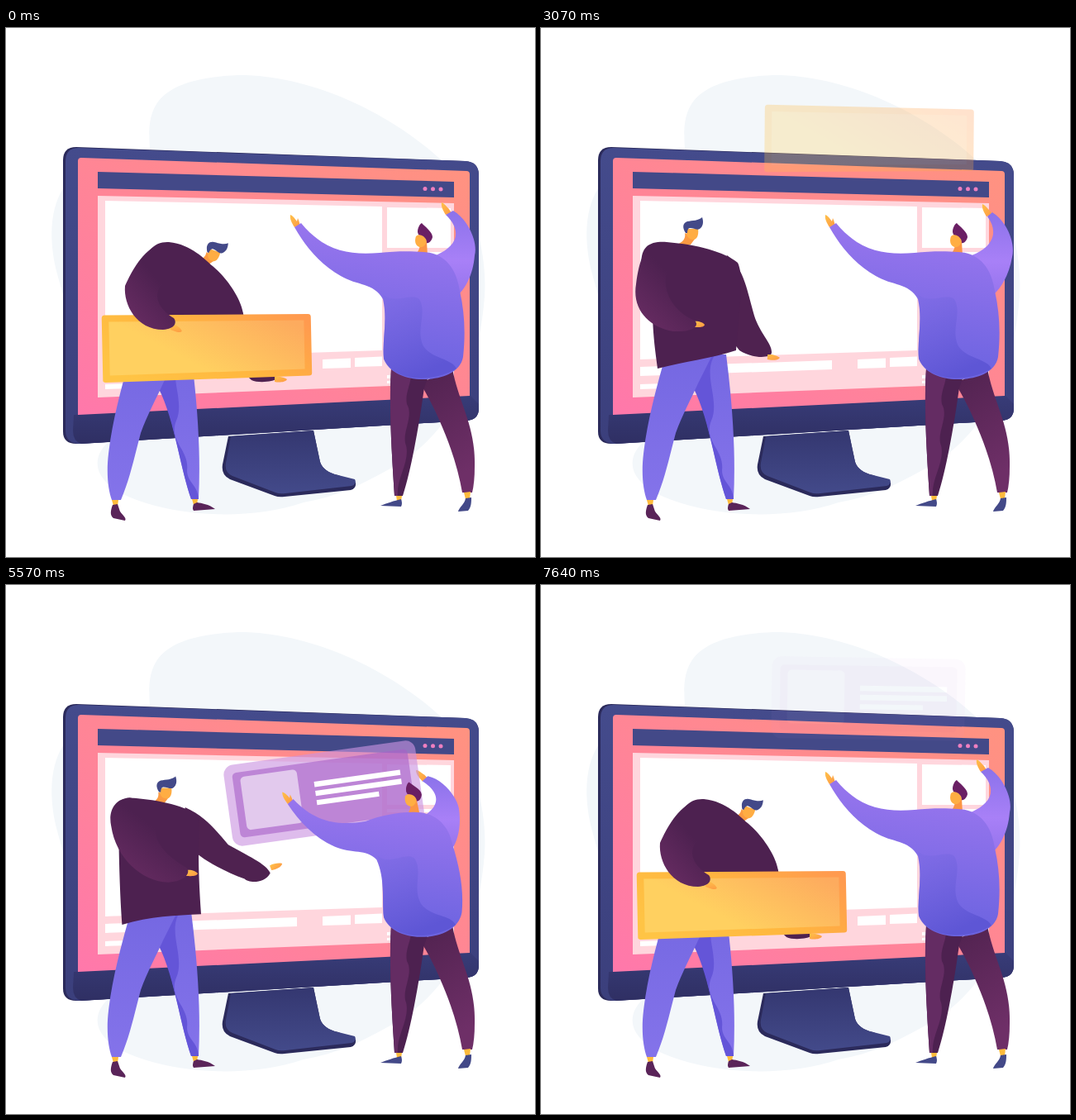
An HTML page for the animation above (7710 ms loop, 640 by 640 pixels).

```html
<!DOCTYPE html>
<html lang="en">
<head>
<meta charset="utf-8">
<title>Building a page</title>
<style>
html, body { margin: 0; width: 100%; height: 100%; overflow: hidden; background: #fff; }
svg { display: block; width: 100%; height: 100%; }
.skin { fill: url(#skin); }
.navy { fill: #434988; }
.plum { fill: #5a2459; }
.white { fill: #fff; }
.shirt { fill: url(#shirt); }
</style>
</head>
<body>
<svg viewBox="0 0 640 640">
  <defs>
    <linearGradient id="frame" x2="0" y2="1"><stop stop-color="#444b8c"/><stop offset="1" stop-color="#3b3f7c"/></linearGradient>
    <linearGradient id="chin" x2="0" y2="1"><stop stop-color="#383c78"/><stop offset="1" stop-color="#2f2f63"/></linearGradient>
    <linearGradient id="screen" y1="1" x2="1" y2="0"><stop stop-color="#ff78ab"/><stop offset="1" stop-color="#ff937f"/></linearGradient>
    <linearGradient id="stand" x2="0" y2="1"><stop stop-color="#343770"/><stop offset="1" stop-color="#434a8a"/></linearGradient>
    <linearGradient id="skin" x2="1" y2="1"><stop stop-color="#ffc14a"/><stop offset="1" stop-color="#fd9843"/></linearGradient>
    <linearGradient id="jeans" x2="0" y2="1"><stop stop-color="#7568e2"/><stop offset="1" stop-color="#8473ea"/></linearGradient>
    <linearGradient id="trousers" x2=".3" y2="1"><stop stop-color="#50224f"/><stop offset="1" stop-color="#6e2f67"/></linearGradient>
    <linearGradient id="sleeve" x1=".8" x2=".1" y2="1"><stop offset=".35" stop-color="#4d2150"/><stop offset="1" stop-color="#6a2d64"/></linearGradient>
    <linearGradient id="shirt" x1=".65" x2=".5" y2="1"><stop stop-color="#9c77ef"/><stop offset="1" stop-color="#6862df"/></linearGradient>
    <linearGradient id="shade" x2=".4" y2="1"><stop stop-color="#7d6be4" stop-opacity=".5"/><stop offset="1" stop-color="#5e56d5"/></linearGradient>
    <linearGradient id="upArm" x2="0" y2="1"><stop stop-color="#8b72ea"/><stop offset=".6" stop-color="#a880f7"/><stop offset="1" stop-color="#9674ed"/></linearGradient>
    <linearGradient id="rim" y1=".7" x2="1" y2=".2"><stop stop-color="#ffc445"/><stop offset=".5" stop-color="#ffb63f"/><stop offset="1" stop-color="#ff9a4f"/></linearGradient>
    <linearGradient id="gold" y1=".7" x2="1" y2=".2"><stop offset=".3" stop-color="#ffd060"/><stop offset="1" stop-color="#fdab5e"/></linearGradient>
  </defs>

  <path fill="#f3f7fa" d="M174 146C171 100 175 62 280 57C375 56 475 110 530 163C570 215 582 280 579 325C572 415 540 490 470 530C430 553 400 567 360 574C300 594 225 592 170 575C120 560 104 537 113 515C118 505 125 500 130 495C100 420 70 330 60 290C51 250 55 215 70 193C100 150 180 170 174 146Z"/>

  <!-- monitor -->
  <path fill="#2b2a5b" d="M269 494L262 528Q260 541 271 546L325 566Q330 568 337 567L417 559Q424 557 423 550L402 541Q384 537 380 525L372 487Z"/>
  <path fill="url(#stand)" d="M272 494L266 526Q264 538 274 542L326 562Q331 564 338 563L418 554Q425 552 422 546L402 541Q384 537 380 525L372 487Z"/>
  <path fill="#2b2a5b" d="M69 160Q69 144 85 144L555 161Q572 162 572 178L572 460Q572 474 557 475L87 503Q69 504 69 488Z"/>
  <path fill="url(#frame)" d="M72 161Q72 145 88 145L556 161Q572 162 572 178L572 460Q572 474 557 475L90 503Q72 503 72 487Z"/>
  <path fill="url(#chin)" d="M82 468L561 444L572 455V460Q572 474 557 475L91 503Q81 500 81 487Z"/>
  <path fill="url(#screen)" d="M87 161Q87 157 91 157L557 173Q561 173 561 177V445L87 468Z"/>
  <path class="navy" d="M111 174L542 186V205L111 194Z"/>
  <g fill="#ee7fc0"><circle cx="507" cy="194.5" r="2.5"/><circle cx="516.5" cy="194.8" r="2.5"/><circle cx="526" cy="195" r="2.5"/></g>
  <path fill="#ffd6dd" d="M111 203L542 212V430L111 447Z"/>
  <path class="white" d="M120 209L455 216V390L120 401ZM461 217L538 218V266H461ZM461 271H538V275H461ZM461 289H538V338H461ZM461 345H538V392H461ZM120 410L352 402V413L120 421ZM120 431L180 429V435L120 437ZM383 401L417 399.500V411L383 412ZM422 399L455 397.500V409L422 410ZM461 420L530 417V421L461 424ZM461 427L530 424V427L461 430Z"/>

  <!-- left legs -->
  <path fill="url(#jeans)" d="M180 395H224C231 450 236 510 233 570H224C210 530 203 470 186 435Z"/>
  <path fill="#6455d8" d="M210 396C195 420 217 450 206 475C196 500 222 510 219 535C219 550 232 552 233 570H224C210 530 203 470 184 435L180 400Z"/>
  <path fill="url(#jeans)" d="M149 402C138 440 128 480 124 515C121 540 124 560 128 571H139C150 545 155 520 163 490C170 470 182 448 190 430L206 398Z"/>
  <path fill="#fdbb3c" d="M128 571H136L135 578H130ZM225 570H232L231 577H227Z"/>
  <path class="plum" d="M129 577C126 585 126 590 130 593L144 596C147 592 138 588 137 582L135 576ZM227 576Q225 581 227 584L253 582C245 576 237 575 231 574Z"/>

  <path id="lFar" fill="#4f2250"/>
  <path id="lFarHand" class="skin" d="M0-3C6-4 12-2 15 0C13 4 4 4 0 3Z"/>
  <g id="lHead">
    <path fill="#fb9a42" d="M-9 0L4 6L-2 14H-18C-10 10-8 6-9 0Z"/>
    <path fill="#ffad43" d="M-7-5L7-5C8 2 6 8 1 8C-5 8-8 3-7-5Z"/>
    <path class="navy" d="M-8 0C-12-6-12-12-6-14C0-15 8-15 12-19C14-13 13-8 9-5C6-3 2-6-3-6C-5-6-6-3-6 0Z"/>
  </g>
  <path id="lTorso" fill="#4d2150"/>

  <!-- right legs -->
  <path fill="url(#trousers)" d="M500 430L540 412C548 455 568 480 567 530Q567 550 564 562H552C545 520 525 470 503 433Z"/>
  <path fill="#4d2150" d="M466 412C463 460 467 520 470 566H480C490 535 500 480 506 435L515 412Z"/>
  <path fill="#642c63" d="M466 412C463 460 467 520 470 566H474C472 545 489 525 484 505C478 490 494 470 485 455C482 440 492 430 490 412Z"/>
  <path fill="#fdbb3c" d="M472 566H479L478 572H473ZM554 562L562 561L561 570H556Z"/>
  <path class="navy" d="M478 570C470 572 460 575 453 578L478 579Q480 575 478 570ZM556 569C555 576 548 580 547 585L559 584C563 580 563 573 563 568Z"/>

  <path id="rFarHand" class="skin" d="M-3 3C-6-2-9-7-8-12C-5-11-2-7 1-4L4 1Z"/>
  <path id="rFar" fill="url(#upArm)"/>

  <g id="gold-card">
    <path fill="url(#rim)" d="M-126.500-38Q-126-41-123-41L123-37.500Q126.500-37.500 126.500-34V34Q126.500 37 123 37L-123 40.500Q-127 40.500-126.500 37Z"/>
    <path fill="url(#gold)" d="M-118-33L118-30V29L-118 32Z"/>
  </g>
  <g id="glass-card">
    <rect x="-117" y="-49" width="234" height="99" rx="12" fill="#ca93e1" fill-opacity=".62"/>
    <rect x="-107" y="-39" width="214" height="79" rx="5" fill="#a862c8" fill-opacity=".6"/>
    <rect x="-98" y="-33" width="69" height="65" rx="5" fill="#fff" fill-opacity=".56"/>
    <path class="white" d="M-10-15H95V-8.500H-10ZM-10-4H95V2.500H-10ZM-10 7.500H66V13.500H-10Z"/>
  </g>

  <path id="lHand" class="skin" d="M0-3C6-4 12-2 14 1C13 5 4 4 0 4Z"/>
  <path id="lArm" fill="url(#sleeve)"/>

  <g id="rHead">
    <path fill="#fb9545" d="M-1 5L7 0L8 18H-9C-4 14-2 10-1 5Z"/>
    <path fill="#ffae43" d="M-6-6C-2-10 5-8 7-1C6 5 2 8-2 7C-7 5-8 0-6-6Z"/>
    <path fill="#6a1f64" d="M-4-11C-4-17-1-21 1-22C4-18 14-12 14-5C13 0 9 3 7 2C7-3 4-7-3-8Z"/>
  </g>
  <path id="rHand" class="skin" d="M-3 3C-6-2-9-7-8-12C-5-11-2-7 0-4L1-8C3-4 3-1 4 1Z"/>
  <path id="rBody" class="shirt"/>
  <path id="rShade" fill="url(#shade)"/>
</svg>

<script>
const LOOP = 7710;

// Left man: hands and head are "x y angle"
const bend = {
  lTorso: 'M150 412C155 380 160 340 165 300C165 270 180 258 197 259C225 262 240 280 250 288C270 305 285 330 287 346C260 390 200 408 150 412Z',
  lFar: 'M235 280C265 300 280 325 287 346C300 380 325 410 327 424C325 428 305 430 297 426C270 400 245 370 235 340Z',
  lArm: 'M188 261C165 268 152 295 144 312C142 335 158 365 190 365C205 364 207 356 203 351C185 340 178 325 187 312C205 290 208 260 188 261Z',
  lHead: '251 274 20', lHand: '200 361 20', lFarHand: '325 425 0'
};
const lift = {
  lTorso: 'M135 402C142 380 152 350 160 322C158 280 158 258 182 257C205 258 225 275 240 288C250 310 230 350 232 414C200 402 170 402 135 402Z',
  lFar: 'M222 275C250 292 270 312 292 328C315 345 340 362 343 376C340 392 312 396 297 392C270 382 245 350 232 325Z',
  lArm: 'M180 257C160 260 156 280 160 300C165 335 185 362 215 364C238 364 246 355 239 350C220 342 207 325 206 305C210 290 205 258 180 257Z',
  lHead: '234 262 12', lHand: '240 357 0', lFarHand: '341 382 -8'
};
const give = {
  lTorso: 'M140 410C138 370 138 330 138 290C126 265 145 255 165 258C195 260 225 270 236 282C240 310 235 340 236 402C205 400 175 400 140 410Z',
  lFar: 'M215 268C240 280 250 290 270 310C300 320 328 330 333 342C325 355 305 354 298 350C270 340 240 330 215 310Z',
  lArm: 'M155 257C135 258 128 275 132 290C140 325 175 356 208 356C228 355 238 345 232 337C215 328 203 320 197 310C192 290 185 260 155 257Z',
  lHead: '198 252 0', lHand: '232 343 0', lFarHand: '334 332 -25'
};
const rest = {
  lTorso: 'M141 412C138 390 136 375 135 350C112 275 118 257 152 259C190 262 222 271 238 284C246 300 240 340 236 390C205 400 175 403 141 412Z',
  lFar: 'M225 275C245 288 250 320 258 348C265 370 280 382 279 393C278 400 255 400 240 390C220 365 215 330 215 300Z',
  lArm: 'M145 260C125 262 120 280 116 320C112 345 130 370 160 378C172 382 178 379 173 372C158 358 150 330 152 310C160 290 165 262 145 260Z',
  lHead: '186 249 0', lHand: '170 376 22', lFarHand: '274 398 3'
};
const wait = {
  ...rest,
  lArm: 'M145 260C125 262 119 280 115 310C110 340 130 362 160 367C185 368 192 360 186 354C165 345 148 325 151 300C160 285 165 262 145 260Z',
  lHead: '183 248 0', lHand: '184 358 0'
};
const ready = {
  lTorso: 'M141 412C138 395 136 380 135 340C117 280 120 256 150 258C190 262 222 270 232 280C225 310 222 330 236 392C205 400 175 403 141 412Z',
  lFar: 'M225 274C250 285 258 310 268 332C280 355 298 372 300 380C298 392 275 392 262 383C240 370 230 345 220 320Z',
  lArm: 'M145 259C125 262 120 280 123 300C126 345 150 368 178 370C196 369 202 362 196 356C175 345 160 325 160 300C165 285 165 262 145 259Z',
  lHead: '189 249 0', lHand: '195 362 5', lFarHand: '296 386 -5'
};

// Right man
const raised = {
  rBody: 'M357 236C385 270 415 275 452 272C470 270 490 270 505 271C530 272 545 290 549 318C555 345 556 370 553 398C549 420 520 426 500 425C480 424 462 415 457 400C455 375 462 355 456 328C445 308 425 312 405 300C380 286 362 264 349 241Z',
  rShade: 'M456 322C470 335 490 320 500 328C510 345 495 365 505 385C515 400 540 400 545 412C520 428 470 430 457 400C455 375 462 355 456 322Z',
  rFar: 'M541 221C560 232 571 260 567 275C565 300 555 315 548 322C530 310 520 290 515 277C548 265 552 245 532 226Z',
  rHead: '502 258 0', rHand: '352 238 0', rFarHand: '535 223 0'
};
const holding = {
  ...raised,
  rFar: 'M546 223C565 235 574 262 570 277C566 300 556 315 548 322C530 310 520 290 515 277C546 268 555 248 540 228Z',
  rFarHand: '542 225 0'
};
const reach = {
  rBody: 'M326 285C350 304 391 311 425 288C440 279 470 276 490 279C515 284 525 300 530 318C540 340 551 365 549 390C546 415 525 427 500 426C475 425 458 415 455 400C455 380 455 350 438 335C425 328 405 337 380 335C350 330 333 310 320 291Z',
  rShade: 'M440 335C460 345 480 325 490 335C500 350 488 375 500 390C512 403 540 398 546 408C525 430 470 430 455 400C455 380 455 350 440 335Z',
  rFar: 'M458 231C480 228 508 234 522 255C532 275 533 300 528 315C510 315 495 300 486 280C488 262 478 243 458 240Z',
  rHead: '471 262 -16', rHand: '322 288 -8', rFarHand: '458 235 8'
};
const grab = {
  rBody: 'M319 328C345 343 365 340 385 327C405 305 425 290 452 286C480 282 505 283 515 305C530 335 548 360 547 390C543 415 525 428 505 428C480 431 462 420 457 407C455 385 448 355 425 345C410 352 400 366 375 366C350 364 332 350 316 337Z',
  rShade: 'M430 344C450 355 460 330 476 338C490 350 478 375 495 390C510 405 535 395 541 408C520 432 470 432 457 407C455 385 448 355 430 344Z',
  rFar: 'M418 262C440 245 470 247 490 255C510 268 520 290 517 308C500 310 490 300 480 285C462 268 440 266 418 271Z',
  rHead: '453 268 -35', rHand: '318 333 -25', rFarHand: '419 267 -45'
};

const leftMan = [[0, bend], [880, lift], [1140, give], [1800, rest], [3070, wait], [3250, wait],
  [3950, bend], [4200, bend], [4930, lift], [5250, give], [6210, ready], [6950, bend], [LOOP, bend]];
const rightMan = [[0, raised], [880, reach], [1140, grab], [1600, holding], [3250, holding],
  [3950, raised], [4250, raised], [4930, reach], [5200, grab], [5750, raised], [LOOP, raised]];

const goldMove = [[0, '243 386 -1.2'], [880, '268 352 -15'], [1140, '291 314 -29'], [1350, '348 256 -22'],
  [1620, '410 205 .2'], [1860, '410 205 .2'], [2360, '406 186 .3'], [3070, '397 135 .5'], [3350, '394 122 .5'],
  [3600, '243 386 -1.2'], [LOOP, '243 386 -1.2']];
const glassMove = [[0, '396 135 .9'], [100, '396 135 .9'], [3000, '243 390 -1.2'], [4200, '243 390 -1.2'],
  [4930, '271 352 -13.5'], [5200, '295 318 -26'], [5500, '370 268 -12'], [5750, '409 212 0'],
  [6210, '411 183 .9'], [7070, '403 153 .9'], [7640, '396 137 .9'], [LOOP, '396 135 .9']];
const goldFade = [[0, '1'], [2250, '1'], [3070, '.28'], [3400, '0'], [5850, '0'], [6210, '.2'], [7150, '1'], [LOOP, '1']];
const glassFade = [[0, '0'], [3250, '0'], [3950, '1'], [6250, '1'], [7640, '.07'], [LOOP, '0']];

const numbers = s => s.match(/-?[\d.]+/g).map(Number);
const tracks = [];

function track(id, attr, keys) {
  const el = document.getElementById(id);
  const shape = attr === 'transform' ? 'translate(0 0) rotate(0)' : keys[0][1];
  tracks.push({ el, attr, shape, times: keys.map(k => k[0]), values: keys.map(k => numbers(k[1])) });
}

function addMan(keys) {
  for (const part in keys[0][1]) {
    const attr = /Hand|Head/.test(part) ? 'transform' : 'd';
    track(part, attr, keys.map(([t, pose]) => [t, pose[part]]));
  }
}

// Monotone cubic through the keys: smooth, never overshooting
function sample({ times, values }, t) {
  let i = 0;
  while (i < times.length - 2 && t >= times[i + 1]) i++;
  const h = times[i + 1] - times[i], u = (t - times[i]) / h;
  return values[i].map((a, n) => {
    const slope = k => values[k + 1] && values[k] ? (values[k + 1][n] - values[k][n]) / (times[k + 1] - times[k]) : 0;
    const s = slope(i), before = slope(i - 1), after = slope(i + 1);
    const mean = (p, q) => p * q > 0 ? 2 * p * q / (p + q) : 0;
    const m0 = mean(before, s) * h, m1 = mean(s, after) * h, d = s * h;
    return a + u * (m0 + u * (3 * d - 2 * m0 - m1 + u * (m0 + m1 - 2 * d)));
  });
}

function draw(now) {
  const t = now % LOOP;
  for (const tr of tracks) {
    const v = sample(tr, t);
    let n = 0;
    tr.el.setAttribute(tr.attr, tr.shape.replace(/-?[\d.]+/g, () => v[n++].toFixed(2)));
  }
}

addMan(leftMan);
addMan(rightMan);
track('gold-card', 'transform', goldMove);
track('gold-card', 'opacity', goldFade);
track('glass-card', 'transform', glassMove);
track('glass-card', 'opacity', glassFade);

const start = performance.now();
function tick() {
  draw(performance.now() - start);
  requestAnimationFrame(tick);
}
tick();
</script>
</body>
</html>
```
